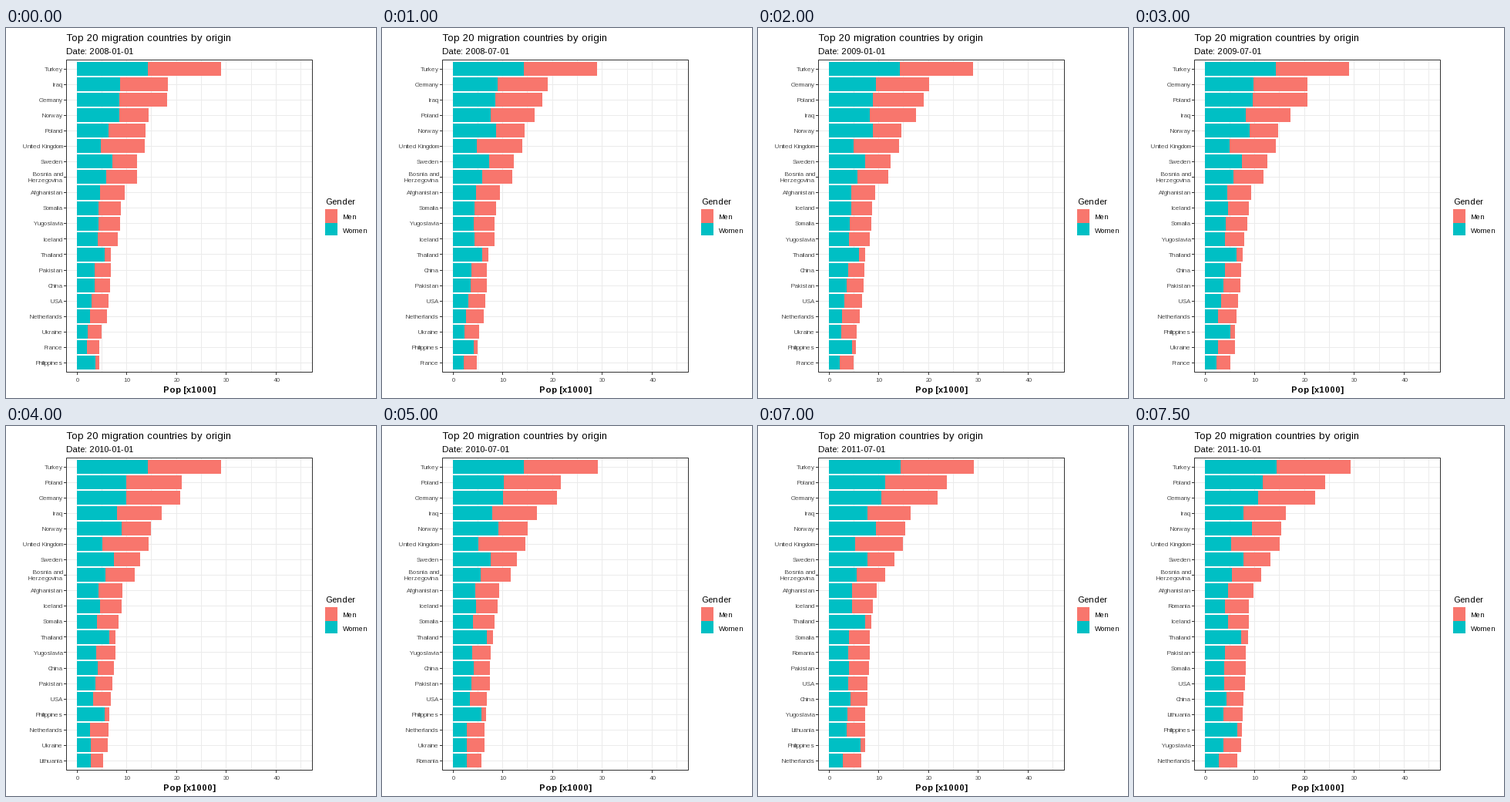
A matplotlib script that plays this animation: 480x480 px, repeating every 8000 ms.

```python
import matplotlib.pyplot as plt
import numpy as np
from matplotlib.animation import FuncAnimation
from matplotlib.patches import Rectangle

plt.rcParams.update({"font.family": "Liberation Sans", "text.hinting_factor": 1})

SIZE, DPI = 480, 80
PX = 72 / DPI                     # one pixel in points
FRAMES, ROWS = 16, 20
RED, TEAL, GRID, DARK, GREY = "#F8766D", "#00BFC4", "#EBEBEB", "#333333", "#4D4D4D"

LEFT, RIGHT, TOP, BOTTOM = 78, 397, 41, 446.5
ZERO, TEN = 92, 64.65             # axis origin and width of ten thousand
STEP = (BOTTOM - TOP) / (ROWS + 0.2)
HALF = 0.45 * STEP

# Evenly spaced key points over the loop: bar length in pixels, women's share
COUNTRIES = {
    "Turkey": [(187, 187, 188.6), (.492,)],
    "Iraq": [(118, 112, 109, 105), (.472,)],
    "Germany": [(117, 133, 135, 143), (.47, .484)],
    "Norway": [(92.6, 99), (.596, .618)],
    "Poland": [(89, 131, 140, 156), (.457, .482)],
    "United Kingdom": [(88.5, 97), (.35,)],
    "Sweden": [(78.5, 85), (.59,)],
    "Bosnia and\nHerzegovina": [(78, 73), (.485,)],
    "Afghanistan": [(62, 59, 63), (.486, .472)],
    "Somalia": [(57, 54, 53), (.493, .479)],
    "Yugoslavia": [(56, 50, 47), (.495, .515)],
    "Iceland": [(52.7, 58, 57), (.513, .528)],
    "Thailand": [(44, 56), (.828, .846)],
    "Pakistan": [(43.5, 46, 53), (.535, .49)],
    "China": [(43.1, 47.7, 50), (.545, .565)],
    "USA": [(41.3, 43, 44.5, 51.5), (.468, .495)],
    "Netherlands": [(39.4, 42.2), (.425,)],
    "Ukraine": [(32, 40.3, 41.5), (.435,)],
    "France": [(29.4, 33.6, 34), (.455,)],
    "Philippines": [(28.8, 41.3, 47.6), (.825, .883)],
    "Lithuania": [(22, 29.8, 36.7, 49.4), (.545, .49)],
    "Romania": [(18, 26, 36.8, 57.2), (.55, .456)],
}


def path(points, q):
    """Value in quarter q on a polyline through evenly spaced points."""
    return np.interp(q, np.linspace(0, FRAMES - 1, len(points)), points)


fig = plt.figure(figsize=(SIZE / DPI, SIZE / DPI), dpi=DPI, facecolor="white")
ax = fig.add_axes([0, 0, 1, 1])
ax.set(xlim=(0, SIZE), ylim=(SIZE, 0))
ax.axis("off")


def line(x0, y0, x1, y1, color):
    ax.plot([x0, x1], [y0, y1], color=color, lw=PX,
            solid_capstyle="butt", snap=False)


def rect(x, y, w, h, color):
    return ax.add_patch(Rectangle((x, y), w, h, fc=color, lw=0,
                                  antialiased=False, zorder=3))


def text(x, y, s, size, color="black", **kw):
    return ax.text(x, y, s, fontsize=size * PX, color=color, **kw)


for k in range(10):
    x = int(ZERO + k * TEN / 2) + 0.5
    line(x, TOP, x, BOTTOM, GRID)
    if k % 2 == 0:
        line(x, 447, x, 450, DARK)
        text(x, 459, str(k * 5), 8, GREY, ha="center")

men, women, labels = [], [], []
for row in range(ROWS):
    c = TOP + STEP * (0.6 + row)
    y = int(c) + 0.5
    line(LEFT, y, RIGHT, y, GRID)
    line(75, y, LEFT, y, DARK)
    y0, y1 = int(c - HALF + 0.37), int(c + HALF + 0.37)
    men.append(rect(ZERO, y0, 0, y1 - y0, RED))
    women.append(rect(ZERO, y0, 0, y1 - y0, TEAL))
    labels.append(text(73.5, c + 1.2, "", 8, GREY, ha="right", va="center",
                       linespacing=1.15))

ax.add_patch(Rectangle((LEFT + 0.5, TOP + 0.5), RIGHT - LEFT, 405, fill=False,
                       ec=DARK, lw=PX, snap=False, zorder=4))

text(78, 17, "Top 20 migration countries by origin", 13)
date = text(78, 34, "", 11)
text(237.5, 473, "Pop [x1000]", 11, ha="center", weight="bold")

text(414, 229, "Gender", 11)
for y, h, name, color in ((235, 18, "Men", RED), (253, 16, "Women", TEAL)):
    rect(414, y, 16, h, color)
    text(437, y + 13, name, 9)


def update(q):
    date.set_text(f"Date: {2008 + q // 4}-{1 + 3 * (q % 4):02d}-01")
    bars = [(path(total, q), path(share, q), name)
            for name, (total, share) in COUNTRIES.items()]
    bars.sort(reverse=True)
    for (total, share, name), m, w, label in zip(bars, men, women, labels):
        m.set_width(round(total))
        w.set_width(round(total * share))
        label.set_text(name)
    return [date, *men, *women, *labels]


anim = FuncAnimation(fig, update, frames=FRAMES, interval=500,
                     repeat=True, repeat_delay=0, blit=False)
plt.show()
```
